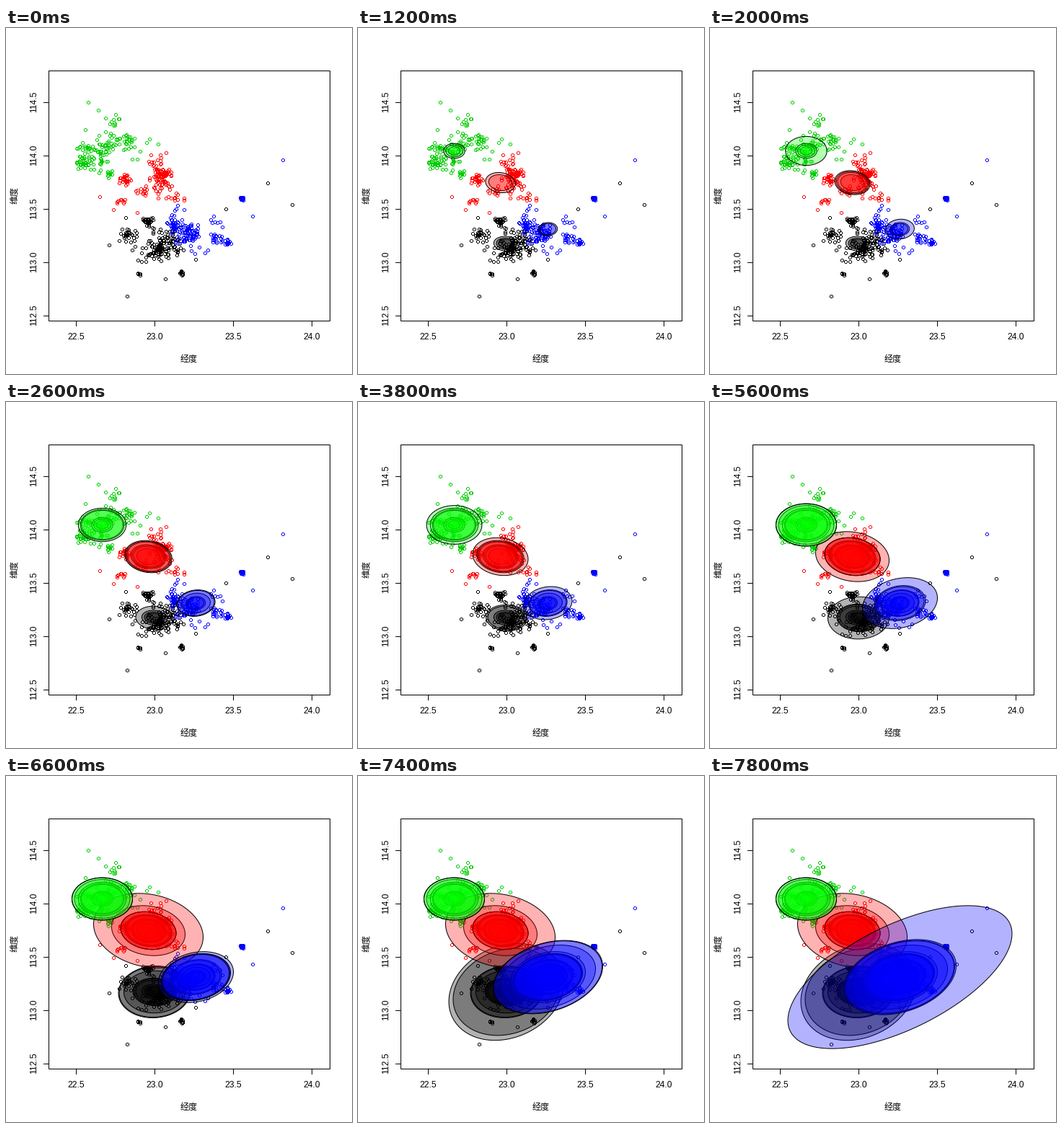
Write a matplotlib script that moves like this. It is 480 px wide and 480 px high and loops after 8 s.

```python
import numpy as np
import matplotlib.pyplot as plt
from matplotlib.animation import FuncAnimation
from matplotlib.collections import PolyCollection
from matplotlib.patches import Polygon

SIZE, DPI = 480, 96
PX = 72 / DPI  # one pixel in points
FRAMES, INTERVAL = 40, 200

# Each cluster, in stacking order:
#   clumps  - x, y, spread, count of its random points
#   lone    - points far from any clump
#   grow    - radius, frame at which it is reached, power of the growth
#   core    - frames at which the growing ellipse is drawn
#   late    - frame: radius of the jumps caused by far points
#   aspect, tilt - value and slope over the radius
CLUSTERS = [
    dict(point="#000000", fill=(0, 0, 0, 0.3), centre=(205.5, 299),
         clumps=[(198, 268, 4, 30), (214, 309, 8.5, 66), (214, 291, 10, 24),
                 (231, 292, 6, 24), (170, 286, 7, 26), (237, 309, 5, 9),
                 (185, 341, 1, 5), (243, 340, 2, 10), (192, 315, 10, 16)],
         lone=[(168, 372), (143, 301), (166, 263), (263, 321), (221, 348),
               (305, 251), (363, 215), (397, 245)],
         grow=(30, 20, 0.33), core=[1, 2, 4, 13, 17, 22],
         late={25: 42.5, 31: 49, 32: 50, 36: 74, 37: 80},
         aspect=(0.52, 0.004), tilt=(-0.2, 0.005)),
    dict(point="#ff0000", fill=(1, 0, 0, 0.3), centre=(197, 214),
         clumps=[(217, 206, 6.5, 56), (165, 211, 5, 28), (190, 227, 5, 14),
                 (206, 186, 8, 18), (215, 220, 10, 28), (162, 239, 4, 9),
                 (236, 239, 6, 8)],
         lone=[(130, 234), (149, 252), (182, 256), (222, 173), (247, 236)],
         grow=(38.5, 17, 0.6), core=[4, 6, 7, 8, 11, 12, 13, 17, 20, 22],
         late={25: 51, 29: 76},
         aspect=(0.68, 0), tilt=(-0.1, -0.001)),
    dict(point="#00cd00", fill=(0, 1, 0, 0.3), centre=(133, 170),
         clumps=[(107, 187, 5.5, 40), (109, 169, 6, 20), (131, 170, 9, 36),
                 (146, 156, 9, 26), (168, 158, 6, 22), (142, 203, 3, 12),
                 (126, 191, 6, 10), (150, 134, 5, 9), (180, 169, 8, 8)],
         lone=[(114, 103), (128, 114), (138, 125), (152, 120), (110, 141),
               (199, 154), (211, 161)],
         grow=(42, 20, 0.55), core=[1, 2, 3, 10, 11, 13, 17, 20, 21],
         late={},
         aspect=(0.7, 0), tilt=(0, 0)),
    dict(point="#0000ff", fill=(0, 0, 1, 0.3), centre=(263, 278.5),
         clumps=[(234, 276, 6, 40), (255, 283, 7, 60), (246, 291, 7, 18),
                 (326.5, 237, 1.3, 22), (292, 292, 4, 20), (308, 297, 2.5, 13),
                 (291, 269, 5, 7), (236, 256, 6, 7), (263, 307, 7, 4)],
         lone=[(384, 183), (342, 261), (329, 239), (280, 308)],
         grow=(35.5, 21, 0.6), core=[3, 4, 8, 12, 13, 19, 21],
         late={28: 52, 31: 46, 32: 47, 33: 48, 34: 66,
               36: 75, 37: 76, 38: 78, 39: 155.5},
         aspect=(0.7, -0.0004), tilt=(0, 0.0039)),
]


def cluster_points(cluster, rng):
    parts = [np.array(cluster["lone"], float)]
    for cx, cy, spread, n in cluster["clumps"]:
        z = np.clip(rng.normal(size=(n, 2)), -1.9, 1.9)
        parts.append(z * (spread, 0.85 * spread) + (cx, cy))
    return np.round(np.vstack(parts))


def ring(x, y):
    """Four crisp bars that form a five pixel wide open dot."""
    bars = [(-1.5, -2.5, 3, 1), (-1.5, 1.5, 3, 1),
            (-2.5, -1.5, 1, 3), (1.5, -1.5, 1, 3)]
    return [[(x + a, y + b), (x + a + w, y + b),
             (x + a + w, y + b + h), (x + a, y + b + h)]
            for a, b, w, h in bars]


def radius_steps(cluster):
    """Pairs of frame and ellipse radius, in drawing order."""
    full, end, power = cluster["grow"]
    steps = [(f, full * min(1, f / end) ** power) for f in cluster["core"]]
    return steps + list(cluster["late"].items())


def ellipse_outline(cluster, rx):
    (cx, cy), (a, da), (b, db) = (cluster[k] for k in
                                  ("centre", "aspect", "tilt"))
    ry = rx * (a + da * rx)
    d = np.arccos(b + db * rx) / 2
    t = np.linspace(0, 2 * np.pi, 120, endpoint=False)
    return np.column_stack([cx + rx * np.cos(t + d), cy - ry * np.cos(t - d)])


def line(xs, ys):
    # The small shift keeps the snapping on the wanted pixel.
    ax.plot(np.array(xs) - 0.25, np.array(ys) - 0.25, color="black", lw=PX,
            solid_capstyle="projecting", solid_joinstyle="miter", zorder=1)


def label(x, y, text, font="Liberation Sans", angle=0):
    ax.text(x, y, text, family=font, size=12 * PX, rotation=angle,
            rotation_mode="anchor", ha="center", va="baseline")


fig = plt.figure(figsize=(SIZE / DPI, SIZE / DPI), dpi=DPI, facecolor="white")
ax = fig.add_axes([0, 0, 1, 1])
ax.set_xlim(-0.5, SIZE - 0.5)
ax.set_ylim(SIZE - 0.5, -0.5)
ax.axis("off")

# Frame, ticks and labels
line([59, 449, 449, 59, 59], [59, 59, 406, 406, 59])
for i in range(4):
    x = 97 + 109 * i
    line([x, x], [406, 413])
    label(x - 0.7, 432, f"{22.5 + 0.5 * i:.1f}")
for i in range(5):
    y = 399 - 74 * i
    line([59, 52], [y, y])
    label(42, y - 1, f"{112.5 + 0.5 * i:.1f}", angle=90)
label(253.3, 462, "经度", "Noto Sans CJK JP")
label(14.4, 231, "维度", "Noto Sans CJK JP", 90)

rng = np.random.default_rng(7)
shapes = []
for layer, cluster in enumerate(CLUSTERS):
    bars = [bar for x, y in cluster_points(cluster, rng) for bar in ring(x, y)]
    ax.add_collection(PolyCollection(bars, facecolors=cluster["point"],
                                     edgecolors="none", linewidths=0,
                                     antialiaseds=False, zorder=2))
    for start, rx in radius_steps(cluster):
        shape = Polygon(ellipse_outline(cluster, rx), lw=PX,
                        facecolor=cluster["fill"], edgecolor="black",
                        zorder=3 + layer, visible=False)
        ax.add_patch(shape)
        shapes.append((start, shape))


def update(frame):
    for start, shape in shapes:
        shape.set_visible(frame >= start)
    return [shape for _, shape in shapes]


anim = FuncAnimation(fig, update, frames=FRAMES, interval=INTERVAL,
                     init_func=lambda: update(0), repeat=True, repeat_delay=0,
                     blit=False)
plt.show()
```
